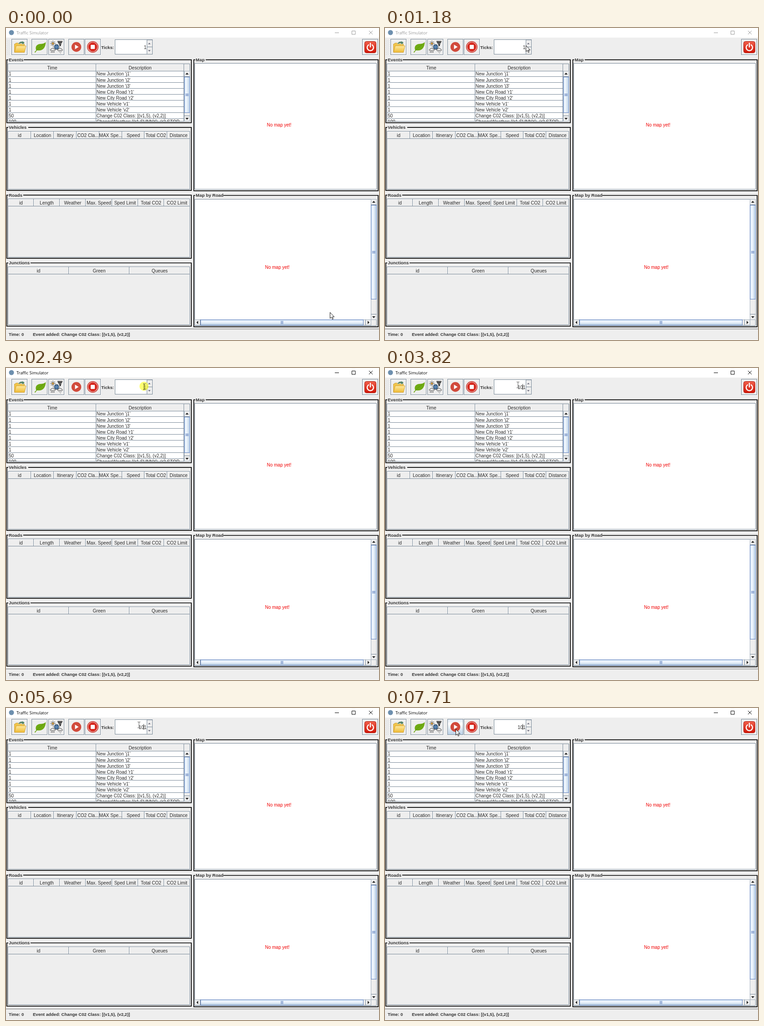
Write an HTML page that moves like this. It is 819x684 px and loops after 8000 ms.

```html
<!DOCTYPE html>
<html lang="en">
<head>
<meta charset="utf-8">
<title>Traffic Simulator</title>
<style>
  html, body { margin: 0; width: 100%; height: 100%; overflow: hidden; background: #eee; }
  svg { display: block; width: 819px; height: 684px; }
  text { font: 10px "Liberation Sans", Arial, sans-serif; fill: #2b2b2b; white-space: pre; }
  .bold { font-weight: bold; font-size: 9.8px; fill: #333; }
  .status { font-size: 9.55px; }
  .head { font-size: 10.1px; text-anchor: middle; }
  .red { fill: #f00000; }
  .title { font: 9.2px "Open Sans", sans-serif; }
  .ticks { font-size: 10.4px; text-anchor: end; }
  .frame { fill: none; stroke: #000; stroke-width: 1.7; }
  #chrome { --ink: #999; }
  #chrome.active { --ink: #000; }
  #chrome text { fill: var(--ink); }
  #chrome path { stroke: var(--ink); fill: none; }
</style>
</head>
<body>
<svg viewBox="0 0 819 684">
  <defs>
    <linearGradient id="thumbV"><stop stop-color="#c3d8ee"/><stop offset=".35" stop-color="#f4f9ff"/><stop offset="1" stop-color="#b8cfe5"/></linearGradient>
    <linearGradient id="thumbH" x2="0" y2="1"><stop stop-color="#c3d8ee"/><stop offset=".35" stop-color="#f4f9ff"/><stop offset="1" stop-color="#b8cfe5"/></linearGradient>
    <linearGradient id="hover" x2="0" y2="1"><stop stop-color="#dde8f3"/><stop offset=".3" stop-color="#fff"/><stop offset="1" stop-color="#b8cfe5"/></linearGradient>
    <linearGradient id="folder" x2="0" y2="1"><stop stop-color="#ffe9a0"/><stop offset="1" stop-color="#eebb35"/></linearGradient>
    <linearGradient id="power" x2="0" y2="1"><stop stop-color="#f0604c"/><stop offset="1" stop-color="#cf1608"/></linearGradient>
    <pattern id="bumps" width="4" height="4" patternUnits="userSpaceOnUse">
      <path d="M0 0h1v1H0zM2 2h1v1H2z" fill="#b4b9bf"/><path d="M1 1h1v1H1zM3 3h1v1H3z" fill="#fff"/>
    </pattern>
    <clipPath id="eventClip"><path d="M4 78H391V205H4z"/></clipPath>
  </defs>
  <rect width="819" height="684" fill="#eee"/>
  <rect width="819" height="21" fill="#fff"/>
  <g id="chrome">
    <text class="title" x="23" y="14">Traffic Simulator</text>
    <path d="M722 10.5h9M759.5 6.5h7.5v7.5h-7.5zM797 6l8 8M805 6l-8 8"/>
  </g>
  <circle cx="12" cy="10" r="5.5" fill="#6d8fae"/>
  <rect x="2" y="25" width="8" height="34" fill="url(#bumps)"/>
  <g id="ui"></g>

  <g id="icons">
    <g stroke="#c58f1e" stroke-width=".7">
      <path d="M18.500 52V35h2l1-2h6l2 2h11v17z" fill="#f1c54b"/>
      <path d="M18.500 53.500L22.500 39H44L40.500 53.500z" fill="url(#folder)"/>
    </g>
    <path d="M27 36c1-5 5-7 9-6l-1-2 6 4-5 5v-3c-4-1-6 0-9 2z" fill="#4f8063" stroke="#e6efe8" stroke-width=".5"/>
    <path d="M62.500 53c1.500-2 2.500-3 4-4-3-7 0-13 8-14 5 0 9-1 13-4-1 13-7 20-19 18-2 1-3 3-4 5z" fill="#6faa14"/>
    <path d="M67 49C72 43 77 39 82 36" fill="none" stroke="#599500" stroke-width=".8"/>
    <g fill="none" stroke="#333">
      <circle cx="103" cy="34" r="2.500" fill="#f1b24a"/>
      <path d="M103 28v2M103 38v2M97 34h2M107 34h2M99 30l1 1M107 30l-1 1M99 38l1-1" stroke-width="1.200"/>
      <path d="M113 29.500h11M114 32h9M115.500 34.500h6M117 37h4M118 39h2" stroke-width="2"/>
      <circle cx="111" cy="41.500" r="5.500" fill="#315f93"/>
      <path d="M105.500 41.500h11M111 36v11M108 37c-2 3-2 6 0 9M114 37c2 3 2 6 0 9" stroke="#a9c6df" stroke-width=".7"/>
      <path d="M99 50c-3-1-2-4 1-4 1-3 5-2 5 0 4 0 4 4 1 4zM115 50c-3-1-2-4 1-4 1-3 5-2 5 0 4 0 4 4 1 4z" fill="#e7e7e7"/>
      <path d="M100 52l-1 2M103 52l-1 2M106 52l-1 2M117 53h1M120 53h1M119 55h1" stroke-width="1.200"/>
    </g>
    <circle cx="154.500" cy="41.500" r="10.700" fill="#d14a3c"/>
    <path d="M151.500 36.500v10l8-5z" fill="#fff"/>
    <circle cx="190.500" cy="41.500" r="12.500" fill="#c9291f"/>
    <circle cx="190.500" cy="41.500" r="10.500" fill="#d6291f" stroke="#eec4bf" stroke-width="1.200"/>
    <rect x="186" y="37" width="9" height="9" rx="1.200" fill="#fff"/>
    <rect x="787.500" y="29.500" width="25" height="25" rx="4" fill="url(#power)" stroke="#b51b0e"/>
    <path d="M796 37a7 7 0 1 0 8 0M800 33.500v8" fill="none" stroke="#fff" stroke-width="2.400" stroke-linecap="round"/>
  </g>

  <text class="ticks" id="ticks" x="308.600" y="46">1</text>
  <path id="caret" d="M302.500 35v13" stroke="#222" stroke-width=".9"/>
  <circle id="click" cx="303" cy="40" r="10" fill="#ff0" fill-opacity=".55"/>
  <path id="arrow" d="M.5 .5V13.700L3.600 10.900L5.700 15.600L7.600 14.700L5.600 10.200H9.700z" fill="#fff" stroke="#000" stroke-width=".9"/>
  <path id="beam" d="M-3 -6.500h2.200l.8 1 .8-1h2.200M-3 6.500h2.200l.8-1 .8 1h2.200M0 -6V6" fill="none" stroke="#333" stroke-width=".8"/>
</svg>

<script>
const $ = id => document.getElementById(id);
let out = '';
const add = s => out += s;
const text = (x, y, s, cls = '') => add(`<text x="${x}" y="${y}" class="${cls}">${s}</text>`);
const rect = (x, y, w, h, fill, stroke = 'none', id = '') =>
  add(`<rect ${id && `id="${id}"`} x="${x}" y="${y}" width="${w}" height="${h}" fill="${fill}" stroke="${stroke}"/>`);
const path = (d, fill, stroke = 'none') => add(`<path d="${d}" fill="${fill}" stroke="${stroke}"/>`);
const EDGE = '#7a8a99', BLUE = '#6382bf';

function button(x, id) {
  path(`M${x + 1.5} 59.500h34v-34`, 'none', '#fff');
  rect(x + .5, 24.5, 34, 34, '#eee', EDGE, id);
}

// Black frame with a title set into its top edge
function panel(x, y, right, bottom, title, gap) {
  add(`<path class="frame" d="M${x + 3} ${y}H${x}V${bottom}H${right}V${y}H${x + gap}"/>`);
  text(x + 4.2, y + 3.4, title, 'bold');
}

// Column edges and their captions
function header(y, edges, names) {
  const last = edges.length - 1;
  path(`M${edges[0]} ${y + 1.5}H${edges[last]}`, 'none', '#fff');
  path(`M4 ${y + 16.5}H${edges[last]}` + edges.slice(1).map(x => `M${x - .5} ${y}v17`).join(''), 'none', EDGE);
  path(edges.slice(0, -1).map(x => `M${x + .5} ${y + 1}v15`).join(''), 'none', '#fff');
  names.forEach((s, i) => text((edges[i] + edges[i + 1]) / 2, y + 13, s, 'head'));
}

function table(y, h, edges, names) {
  rect(4.5, y + .5, 399, h, '#eee', EDGE);
  header(y, edges, names);
}

function triangle(x, y, dx, dy, size = 3.5, fill = '#222') {
  const d = size * .55;
  path(`M${x + dx * d} ${y + dy * d}L${x - dx * d + dy * size} ${y - dy * d + dx * size}L${x - dx * d - dy * size} ${y - dy * d - dx * size}z`, fill);
}

// Scroll bar along y when tall, along x otherwise
function scroll(x, y, w, h, from, to) {
  const tall = h > w, mid = (from + to) / 2;
  rect(x + .5, y + .5, w - 1, h - 1, '#eee', '#a3b0bd');
  if (tall) {
    const c = x + w / 2;
    path(`M${x} ${y + 12.5}h${w}M${x} ${y + h - 12.5}h${w}`, 'none', EDGE);
    rect(x + .5, from + .5, w - 1, to - from, 'url(#thumbV)', BLUE);
    path([-2, 0, 2].map(d => `M${c - 3.5} ${mid + d + .5}h7`).join(''), 'none', BLUE);
    triangle(c, y + 6, 0, -1);
    triangle(c, y + h - 6, 0, 1);
  } else {
    const c = y + h / 2;
    path(`M${x + 12.5} ${y}v${h}M${x + w - 12.5} ${y}v${h}`, 'none', EDGE);
    rect(from + .5, y + .5, to - from, h - 1, 'url(#thumbH)', BLUE);
    path([-2, 0, 2].map(d => `M${mid + d + .5} ${c - 3.5}v7`).join(''), 'none', BLUE);
    triangle(x + 6, c, -1, 0);
    triangle(x + w - 6, c, 1, 0);
  }
}

[12, 56, 93, 173, 782].forEach(x => button(x));
button(137, 'play');
text(209, 45.5, 'Ticks:', 'bold');
rect(239.5, 25.5, 82, 32, '#fff', EDGE);
rect(309.5, 26, 12, 31.5, '#eee', EDGE);
path('M309 41.500h13', 'none', EDGE);
triangle(314.7, 34, 0, -1, 2.8, '#667');
triangle(314.7, 50, 0, 1, 2.8, '#667');

const L = 1.8, LR = 406.9, R = 412.4, RR = 817.2;
panel(L, 69.6, LR, 207.7, 'Events', 37);
rect(4.5, 78.5, 399, 126, '#eee', EDGE);
rect(5, 95, 386, 109, '#fff');
header(78, [5, 198, 391], ['Time', 'Description']);
add('<g clip-path="url(#eventClip)">');
[[1, "New Junction 'j1'"], [1, "New Junction 'j2'"], [1, "New Junction 'j3'"],
 [1, "New City Road 'r1'"], [1, "New City Road 'r2'"], [1, "New Vehicle 'v1'"], [1, "New Vehicle 'v2'"],
 [50, 'Change C02 Class: [(v1,5), (v2,2)]'], [100, 'ChangeWeather: [(r1,SUNNY), (r2,STOR...']
].forEach(([time, event], i) => {
  const y = 94 + i * 13.1;
  text(6, y + 10.4, time);
  text(198.7, y + 10.4, event);
  path(`M5 ${Math.round(y + 13) - .5}H391`, 'none', EDGE);
});
path('M197.500 94V205M390.500 94V205', 'none', EDGE);
add('</g>');
scroll(391, 94, 13, 111, 107, 185);

panel(L, 217.8, LR, 356.1, 'Vehicles', 47);
table(226, 127, [5, 55, 105, 155, 205, 255, 304, 354, 404],
  ['id', 'Location', 'Itinerary', 'CO2 Cla...', 'MAX Spe...', 'Speed', 'Total CO2', 'Distance']);
panel(L, 366.4, LR, 504.8, 'Roads', 36);
table(374, 128, [5, 61, 118, 175, 233, 290, 347, 404],
  ['id', 'Length', 'Weather', 'Max. Speed', 'Sped Limit', 'Total CO2', 'CO2 Limit']);
panel(L, 515, LR, 653.6, 'Junctions', 52);
table(523, 127, [5, 138, 271, 404], ['id', 'Green', 'Queues']);

panel(R, 69.6, RR, 356.8, 'Map', 26);
rect(414.5, 77.5, 399, 276, '#fff', EDGE);
text(572.7, 216, 'No map yet!', 'red');
panel(R, 367, RR, 655.2, 'Map by Road', 65);
rect(414.5, 375.5, 399, 277, '#eee', EDGE);
rect(415, 376, 386, 263, '#fff');
text(568.7, 527.5, 'No map yet!', 'red');
scroll(801, 375, 13, 265, 388, 594);
scroll(414, 639, 388, 13, 427, 784);

path('M0 659.500H819', 'none', '#909090');
path('M0 660.500H819', 'none', '#c4c4c4');
path('M0 683.500H819', 'none', '#fff');
text(6, 675, 'Time: 0', 'bold status');
text(59, 675, 'Event added: Change C02 Class: [(v1,5), (v2,2)]', 'bold status');
$('ui').innerHTML = out;

// Pointer stops: time, x, y, shape
const A = 'arrow', I = 'beam', STEP = 79;
const stops = [[0, 711, 623, A]];
for (let i = 1; i <= 11; i++) {
  const u = i / 11, p = u * u * (3 - 2 * u);
  stops.push([70 + (i - 1) * STEP, 711 - 402 * p, 623 - 582 * p, i < 11 ? A : I]);
}
stops.push(
  [930, 305, 40, I], [1010, 301, 40, I], [1180, 309, 38, A], [1250, 311, 37, A], [1330, 304, 32, I],
  [1710, 309, 36, A], [1800, 311, 37, A], [1880, 304, 32, I], [2030, 311, 37, A],
  [2260, 309, 39, A], [2340, 305, 32, I], [2490, 304, 41, I], [2810, 292, 37, I]);
[[272, 45, I], [245, 53, I], [222, 60, A], [203, 64, A], [188, 65, A], [176, 65, A], [168, 63, A],
 [163, 60, A], [160, 54, A], [159, 49, A], [158, 46, A]]
  .forEach((s, i) => stops.push([6217 + i * STEP, ...s]));
stops.push([7560, 155, 46, A]);

const values = [[0, '1'], [3440, '11'], [3820, '101'], [4590, '1001'], [5690, '101']];
const blinks = [2490, 2970, 3440, 4280, 4590, 5130, 5600, 6220, 6690, 7180, 7710];
const at = (list, t) => list.filter(s => s[0] <= t).pop();
const show = (id, on) => $(id).style.display = on ? '' : 'none';

function draw() {
  const t = performance.now() % 8000;
  const [, x, y, shape] = at(stops, t);
  for (const id of [A, I]) show(id, id === shape);
  $(shape).setAttribute('transform', `translate(${Math.round(x)} ${Math.round(y)})`);
  $('ticks').textContent = at(values, t)[1];
  show('caret', blinks.filter(b => b <= t).length % 2);
  show('click', t >= 2490 && t < 2660);
  $('chrome').classList.toggle('active', t >= 2490);
  $('play').setAttribute('fill', t >= 6849 ? 'url(#hover)' : '#eee');
  requestAnimationFrame(draw);
}
draw();
</script>
</body>
</html>
```
